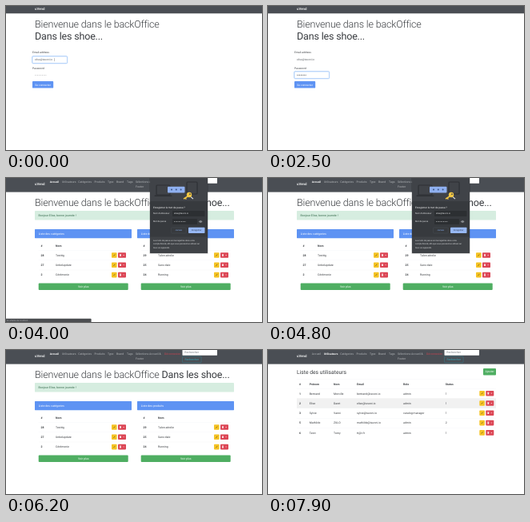
These frames come from a looping animation (320 px wide and 180 px high, 8000 ms). An HTML page:

```html
<!DOCTYPE html>
<html lang="fr">
<head>
<meta charset="utf-8">
<title>backOffice</title>
<style>
  html, body { margin: 0; width: 320px; height: 180px; overflow: hidden; background: #fff; }
  svg { display: block; }
  text {
    font-family: Roboto, "Liberation Sans", sans-serif;
    text-rendering: geometricPrecision;
    white-space: pre;
  }
  .title { font-size: 12.56px; font-weight: 300; letter-spacing: -0.015em; }
  .strong { font-weight: 400; }
</style>
</head>
<body>
<svg id="stage" width="320" height="180" viewBox="0 0 320 180"></svg>
<script>
const LOOP = 8000, STEP = 100;
const BAR = '#4a4e54', BLUE = '#5e93f3', GREEN = '#4fae62', INK = '#3a3d41';
const MAIL = 'elise@tavoni.io';

const rect = (x, y, w, h, fill, r = 0, extra = '') =>
  `<rect x="${x}" y="${y}" width="${w}" height="${h}" rx="${r}" fill="${fill}" ${extra}/>`;
const text = (x, y, str, size = 3.55, fill = INK, weight = 400, anchor = 'start') =>
  `<text x="${x}" y="${y}" font-size="${size}" fill="${fill}" font-weight="${weight}" text-anchor="${anchor}">${str}</text>`;
const title = (y, str, style = '') =>
  `<text class="title ${style}" x="36" y="${y}" fill="${INK}">${str}</text>`;
const group = (id, body) => `<g id="${id}">${body}</g>`;
const dots = (x, y, n, pitch, r, fill) => Array.from({ length: n }, (_, i) =>
  `<circle cx="${x + i * pitch}" cy="${y}" r="${r}" fill="${fill}"/>`).join('');
const button = (x, y, w, h, fill, label, size = 3.4) =>
  rect(x, y, w, h, fill, 0.9) + text(x + w / 2, y + h / 2 + 1.2, label, size, '#fff', 400, 'middle');
const focusRing = (id, y) => group(id,
  rect(32.6, y - 0.4, 44.2, 9.3, 'none', 1.2, 'stroke="#c6dcfb" stroke-width="0.9"') +
  rect(33, y, 43.4, 8.5, '#fff', 0.9, 'stroke="#80b4f5" stroke-width="0.5"'));

// Login page
function loginPage() {
  return rect(0, 0, 320, 180, '#fff') + rect(0, 0, 320, 9.3, BAR) +
    text(36, 4.6, 'uVend', 4.4, '#fff', 500) +
    title(26.7, 'Bienvenue dans le backOffice') +
    title(41.9, 'Dans les shoe...', 'strong') +
    text(33, 59.3, 'Email address', 3.35) +
    focusRing('mailFocus', 63) +
    text(36, 68.4, MAIL, 3.3, '#5a5e63') +
    rect(60.6, 65.2, 0.3, 4, '#333', 0, 'id="mailCaret"') +
    text(33, 78.7, 'Password', 3.35) +
    focusRing('passFocus', 82) +
    group('savedPass', dots(36.5, 86.4, 10, 1.5, 0.4, '#8a8d91')) +
    group('typedPass', dots(36.7, 86.2, 8, 1.5, 0.52, '#4d5156')) +
    rect(36, 84.1, 0.3, 4, '#333', 0, 'id="passCaret"') +
    button(33, 94, 26.2, 8.6, BLUE, 'Se connecter', 3.4) +
    group('pressed',
      rect(32.6, 93.6, 27, 9.4, 'none', 1.3, 'stroke="#b3cbf8" stroke-width="0.9"') +
      button(33, 94, 26.2, 8.6, '#477de0', 'Se connecter', 3.4));
}

// Top menu shared by the signed-in pages
function menu(active) {
  const items = [[54.7, 'Accueil'], [70, 'Utilisateurs'], [90.2, 'Catégories'], [110.4, 'Produits'],
    [127, 'Type'], [138, 'Brand'], [151, 'Tags'], [162, 'Sélections Accueil &amp;']];
  const links = items.map(([x, label], i) => i === active
    ? text(x, 6.2, label, 3.4, '#fff', 700)
    : text(x, 6.2, label, 3.5, '#b4b7ba')).join('');
  return rect(0, 0, 320, 17.6, BAR) + text(36, 9, 'uVend', 4.4, '#fff', 500) + links +
    text(162, 11.5, 'Footer', 3.5, '#b4b7ba') +
    text(198, 6.2, 'Déconnexion', 3.5, '#c44452') +
    rect(220.5, -2, 43.5, 8.8, '#fff', 0.9) + text(223.3, 3.9, 'Rechercher', 3.5, '#777c82') +
    rect(220.5, 8, 23.6, 7.8, 'none', 0.9, 'stroke="#2a9fb3" stroke-width="0.3"') +
    text(232.3, 13.1, 'Rechercher', 3.5, '#37a9bc', 400, 'middle');
}

function rowActions(x, y) {
  return rect(x, y - 3.3, 6.6, 6.6, '#f5c324', 0.8) +
    `<path d="M${x + 2.4} ${y + 1}l1.8-1.9" stroke="#5b4c16" stroke-width="0.7"/>` +
    rect(x + 8, y - 3.3, 10, 6.6, '#dc4655', 0.8) +
    rect(x + 10.2, y - 0.9, 1.6, 2.2, '#fff', 0.2) + rect(x + 9.9, y - 1.5, 2.2, 0.4, '#fff') +
    `<path d="M${x + 14.2} ${y - 0.4}h1.8l-.9 .9z" fill="#fff"/>`;
}

function card(x, heading, rows) {
  const inner = x + 4.7, idX = x + 7.4, nameX = x + 26;
  const list = rows.map(([id, name], i) => {
    const y = 96.5 + i * 12.3;
    return rect(inner, y - 6.2, 112, 0.2, '#e6e9ec') +
      text(idX, y + 1.3, id, 3.5, INK, 700) + text(nameX, y + 1.3, name, 3.5) +
      rowActions(x + 96, y);
  }).join('');
  return rect(x, 64, 121, 11.2, BLUE, 0.6) + text(inner, 70.7, heading, 3.6, '#fff') +
    text(idX, 86, '#', 3.5, INK, 700) + text(nameX, 86, 'Nom', 3.5, INK, 700) +
    list + button(inner, 131.6, 112, 8.4, GREEN, 'Voir plus', 3.5);
}

function homePage() {
  return rect(0, 0, 320, 180, '#fff') + menu(0) +
    group('hoverUsers', rect(69, 2, 20, 6, BAR) + text(70, 6.2, 'Utilisateurs', 3.5, '#dfe1e3')) +
    title(35, 'Bienvenue dans le backOffice <tspan class="strong">Dans les shoe...</tspan>') +
    rect(36, 41, 249, 11.6, '#d6ede0', 0.9) +
    text(40.6, 48.1, 'Bonjour Elise, bonne journée !', 3.6, '#34694a') +
    card(36, 'Liste des catégories', [[28, 'Testttg'], [27, 'Unbelupdate'], [2, 'Cérémonie']]) +
    card(164, 'Liste des produits', [[29, 'Talon aérolie'], [25, 'Sans-dale'], [24, 'Running']]);
}

function popup() {
  const light = '#e9ebed', field = '#2c2f32', shade = '#2e3135';
  return rect(179.2, -2, 73.8, 97, '#000', 1.6, 'opacity="0.16"') +
    rect(180, -2, 72, 96, '#373a3e', 1.2) +
    rect(180, 0, 72, 29, '#404348') +
    rect(188, 9, 17, 12, 'none', 1, `stroke="${shade}" stroke-width="1.2"`) +
    rect(185.5, 21.5, 22, 1.6, shade, 0.8) +
    rect(226, 5, 13, 15, 'none', 1, `stroke="${shade}" stroke-width="1.2"`) +
    rect(202, 10.8, 21.5, 7.6, '#8fb0f0', 1) +
    dots(207, 14.6, 3, 5.8, 1, '#3d5688') +
    '<circle cx="229" cy="21" r="3.2" fill="#f2c744"/><circle cx="230" cy="20.2" r="0.9" fill="#4a4b4e"/>' +
    '<path d="M227 23l-5 3.2M224 24.8l1.3 1.8" stroke="#f2c744" stroke-width="1.5"/>' +
    '<path d="M231 23.6l3 2.5" stroke="#dfe2e6" stroke-width="1.2"/>' +
    text(184, 38.2, 'Enregistrer le mot de passe ?', 3.1, '#fff') +
    text(184, 45.4, "Nom d'utilisateur", 2.7, light) +
    rect(208, 41, 40.5, 7, field, 0.7) + text(210, 45.4, MAIL, 2.7, light) +
    text(184, 55.4, 'Mot de passe', 2.7, light) +
    rect(208, 51, 31, 7, field, 0.7) + dots(210.5, 54.5, 10, 1.5, 0.45, light) +
    '<path d="M241.2 54.5q2-2.4 4 0q-2 2.4-4 0z" fill="none" stroke="#cfd2d6" stroke-width="0.5"/>' +
    '<circle cx="243.2" cy="54.5" r="0.6" fill="#cfd2d6"/>' +
    rect(206.5, 62, 18.5, 7, 'none', 0.8, 'stroke="#565a60" stroke-width="0.3"') +
    group('hoverNever', rect(206.5, 62, 18.5, 7, '#474e5b', 0.8)) +
    text(215.8, 66.4, 'Jamais', 2.6, '#8ab4f8', 400, 'middle') +
    rect(228, 61.8, 20.5, 7.2, '#97b8f4', 0.8) +
    text(238.2, 66.4, 'Enregistrer', 2.6, '#273349', 400, 'middle') +
    rect(180, 73.6, 72, 20.4, '#404347', 1) +
    ['Les mots de passe sont enregistrés dans votre',
      'compte Norvik, afin que vous puissiez les utiliser sur',
      'tous vos appareils'].map((line, i) => text(184, 79 + i * 4.3, line, 2.5, light)).join('');
}

function usersPage() {
  const cols = [39, 51.7, 82, 111, 169, 221.7];
  const line = (cells, y, weight) => cells.map((c, i) =>
    text(cols[i], y, c, 3.5, INK, i ? weight : 700)).join('');
  const people = [
    [1, 'Bertrand', 'Morville', 'bertrand@tavoni.io', 'admin', 1],
    [2, 'Elise', 'Daret', MAIL, 'admin', 1],
    [3, 'Sylvie', 'Vanni', 'sylvie@tavoni.io', 'catalog-manager', 1],
    [5, 'Mathilde', 'ZULO', 'mathilde@tavoni.io', 'admin', 2],
    [6, 'Tatot', 'Tomy', 'tt@t.fr', 'admin', 1]];
  return rect(0, 0, 320, 180, '#fff') + menu(1) +
    text(36, 29.6, 'Liste des utilisateurs', 6.75, INK, 400) +
    button(269, 23, 16, 8.4, GREEN, 'Ajouter', 3.5) +
    rect(36, 36.2, 249, 0.2, '#e6e9ec') +
    line(['#', 'Prénom', 'Nom', 'Email', 'Role', 'Status'], 43.6, 700) +
    people.map((p, i) => {
      const y = 54.2 + i * 12.3;
      return rect(36, y - 6.1, 249, i === 1 ? 12.3 : 0.2, i === 1 ? '#f1f1f1' : '#e6e9ec') +
        line(p, y + 1.3, 400) + rowActions(264.3, y);
    }).join('');
}

const stage = document.getElementById('stage');
stage.innerHTML = group('login', loginPage()) + group('home', homePage()) +
  group('popup', popup()) + group('users', usersPage()) +
  group('status', rect(-1, 175.8, 107.6, 5, '#4b4d50', 0.8) +
    text(1, 179.2, 'En attente de localhost...', 2.6, '#b9bbbe'));

const el = {};
stage.querySelectorAll('[id]').forEach(node => el[node.id] = node);
const typed = [...el.typedPass.children];
const typeTimes = [800, 1100, 1300, 1400, 1600, 1600, 1900, 2000];

const fade = (id, v) => el[id].setAttribute('opacity', v);
const show = (id, on) => el[id].setAttribute('display', on ? 'inline' : 'none');
// Stepped ramp: already moving at a, complete at b
const ramp = (t, a, b) => Math.min(1, Math.max(0, (t - a + STEP) / (b - a + STEP)));

function render(t) {
  show('login', t < 4000);
  show('home', t >= 4000 && t < 7500);
  show('users', t >= 7500);

  const toPass = ramp(t, 100, 300), toButton = ramp(t, 3000, 3200);
  fade('mailFocus', 1 - toPass);
  show('mailCaret', t < 100);
  fade('passFocus', toPass * (1 - toButton));
  fade('pressed', toButton);
  fade('savedPass', 1 - ramp(t, 700, 800));

  const count = typeTimes.filter(at => t >= at).length;
  typed.forEach((dot, i) => dot.setAttribute('display', i < count ? 'inline' : 'none'));
  el.passCaret.setAttribute('x', 36 + count * 1.5);
  show('passCaret', t >= 700 && t < 2500);

  // The status bar shows while a page loads, then fades
  const loading = t < 7400 ? [3500, 4300, 4800] : [7400, 7600, 7900];
  show('status', t >= loading[0]);
  fade('status', 1 - ramp(t, loading[1], loading[2]));

  show('popup', t >= 4000 && t < 6200);
  fade('hoverNever', ramp(t, 5200, 5300));
  fade('popup', 1 - ramp(t, 6000, 6200));
  fade('hoverUsers', ramp(t, 7100, 7200));
}

const start = performance.now();
function tick() {
  const t = (performance.now() - start) % LOOP;
  render(Math.floor(t / STEP) * STEP);
  requestAnimationFrame(tick);
}
tick();
</script>
</body>
</html>
```
